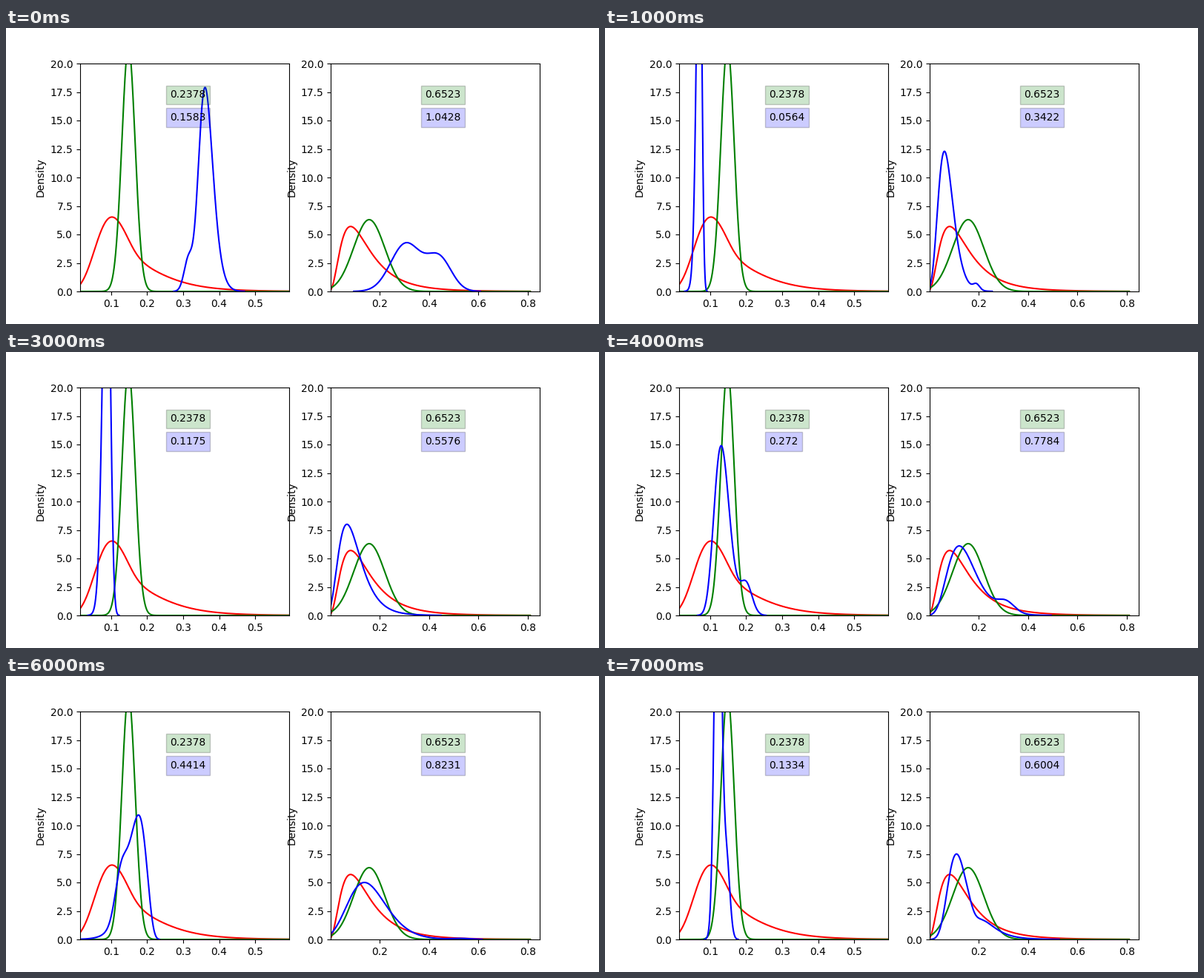
A matplotlib script for the animation above (8000 ms loop, 800 by 400 pixels).

```python
import numpy as np
import matplotlib.pyplot as plt
from matplotlib.animation import FuncAnimation

plt.rcParams["font.family"] = "DejaVu Sans"
X = np.linspace(0, 0.81, 1500)


def bell(height, peak, spread, skew=0):
    """Bell curve; a positive skew gives a long right tail."""
    z = (X - peak) / spread
    if skew:
        z = np.log(np.maximum(1 + skew * z, 1e-9)) / skew
    return height * np.exp(-z * z / 2)


def visible(y):
    return np.where(y > 0.01, y, np.nan)


RED = [bell(6.53, .102, .05, .2) + bell(.95, .245, .06, .5),
       bell(5.7, .081, .06, .6)]
GREEN = [bell(21.5, .148, .0185), bell(6.3, .1564, .0633)]

# One step per second: left score, left curve, right score, right curve.
STEPS = [
    ("0.1583", bell(17.9, .3608, .02, .17) + bell(3, .3155, .0125),
     "1.0428", bell(4.2, .305, .061) + bell(2.9, .44, .05)),
    ("0.0564", bell(37, .0697, .0074, -.15),
     "0.3422", bell(12.3, .06, .031, .25) + bell(.5, .19, .013)),
    ("0.1302", bell(33, .067, .0115),
     "0.6947", bell(8.9, .062, .042, .4)),
    ("0.1175", bell(38, .0872, .0105, -.1),
     "0.5576", bell(8, .066, .046, .4)),
    ("0.272", bell(14.9, .1305, .0215, .12) + bell(2.65, .2, .0165),
     "0.7784", bell(6.1, .12, .058, .3) + bell(.9, .31, .035)),
    ("0.3562", bell(12, .15, .027),
     "0.8047", bell(5.5, .128, .068, .25)),
    ("0.4414", bell(10.9, .176, .026, -.3) + bell(3.2, .126, .016),
     "0.8231", bell(5, .137, .078, .2) + bell(.08, .53, .04)),
    ("0.1334", bell(41, .1215, .0093) + bell(7, .1455, .009),
     "0.6004", bell(7.5, .109, .04, .2) + bell(1.1, .235, .04, .5)),
]


def badge(ax, x, y, label, color):
    return ax.text(x, y, label, bbox=dict(facecolor=color, alpha=0.2))


fig, axes = plt.subplots(1, 2, figsize=(8, 4), dpi=100)
panels = zip(axes, [(.0136, .5942), (.0006, .8485)], [.1, .2],
             [.263, .3828], ["0.2378", "0.6523"], RED, GREEN)
lines, scores = [], []

for ax, xlim, gap, text_x, score, red, green in panels:
    ax.set(xlim=xlim, ylim=(0, 20), ylabel="Density",
           xticks=np.arange(gap, xlim[1], gap))
    ax.plot(X, red, color="red")
    ax.plot(X, green, color="green")
    lines += ax.plot([], [], color="blue")
    badge(ax, text_x, 17, score, "green")
    scores.append(badge(ax, text_x, 15, "", "blue"))


def update(step):
    left_score, left, right_score, right = STEPS[step]
    for line, curve in zip(lines, (left, right)):
        line.set_data(X, visible(curve))
    for text, score in zip(scores, (left_score, right_score)):
        text.set_text(score)
    return lines + scores


anim = FuncAnimation(fig, update, frames=len(STEPS), interval=1000, repeat=True)
plt.show()
```
